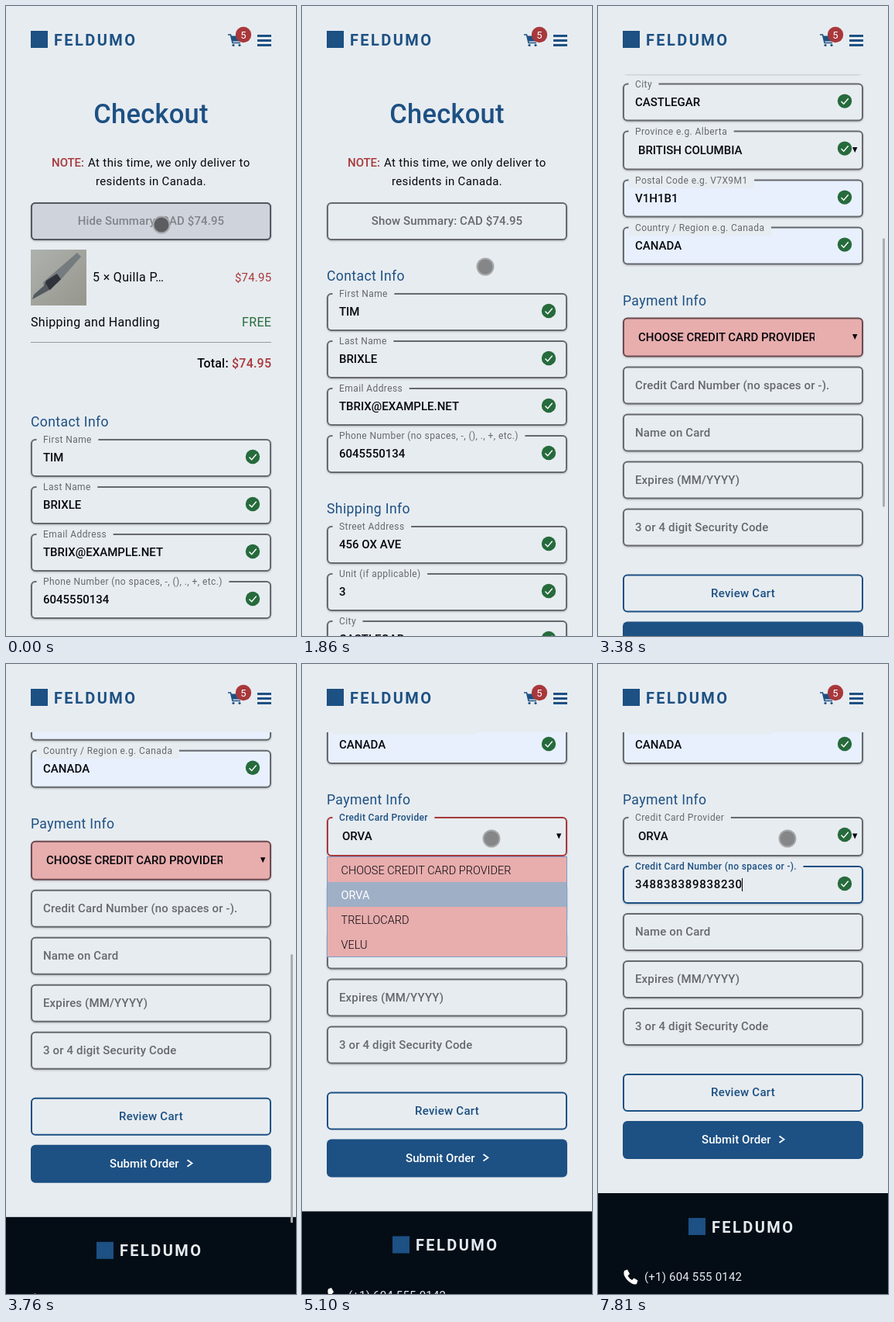
Write an HTML page that moves like this. It is 375 px wide and 812 px high and loops after 8000 ms.

```html
<!DOCTYPE html>
<html lang="en">
<head>
<meta charset="utf-8">
<title>Checkout</title>
<style>
  html, body { margin: 0; width: 100%; height: 100%; overflow: hidden; background: #e7ecf0; }
  svg { display: block; font-family: Roboto, "Open Sans", sans-serif; }
  text { white-space: pre; }
  .raised { filter: drop-shadow(0 1px 1px rgba(0, 0, 0, .22)); }
</style>
</head>
<body>
<svg id="stage" width="375" height="812" viewBox="0 0 375 812"></svg>
<script>
const LOOP = 8000;
const BG = '#e7ecf0', BLUE = '#1d5083', RED = '#a8383b', GRAY = '#66696e', INK = '#05070d';
const GREEN = '#266b3c', PINK = '#e8adad', AUTOFILL = '#e8f0fe', FOOTER = '#040d16';
const BRAND = 'FELDUMO', CARD = 'ORVA', CARD_NUMBER = '348838389838230';
const CHOOSE = 'CHOOSE CREDIT CARD PROVIDER';
const stage = document.getElementById('stage');

function el(tag, attrs, parent = stage) {
  const node = document.createElementNS('http://www.w3.org/2000/svg', tag);
  for (const key in attrs) node.setAttribute(key, attrs[key]);
  return parent.appendChild(node);
}
const group = parent => el('g', {}, parent);
const rect = (parent, x, y, width, height, fill, more) =>
  el('rect', { x, y, width, height, fill, ...more }, parent);
const path = (parent, d, more) => el('path', { d, ...more }, parent);

function text(parent, x, y, str, { size = 15, weight = 500, fill = INK, gap = 0, anchor = 'start' } = {}) {
  const node = el('text', {
    x, y, fill, 'font-size': size, 'font-weight': weight,
    'letter-spacing': gap, 'text-anchor': anchor
  }, parent);
  node.textContent = str;
  return node;
}

const clamp = v => Math.max(0, Math.min(1, v));
const ramp = (t, a, b) => clamp((t - a) / (b - a));
const lerp = (a, b, k) => a + (b - a) * k;
const ease = k => k * k * (3 - 2 * k);
const mix = (a, b, k) => `color-mix(in srgb, ${b} ${k * 100}%, ${a})`;
const show = (node, on) => node.setAttribute('visibility', on ? 'visible' : 'hidden');
const shift = (node, y) => node.setAttribute('transform', `translate(0 ${y})`);

// Linear interpolation through [time, value] points.
function track(points, t) {
  if (t <= points[0][0]) return points[0][1];
  for (let i = 1; i < points.length; i++) {
    const [t0, a] = points[i - 1], [t1, b] = points[i];
    if (t < t1) return lerp(a, b, ramp(t, t0, t1));
  }
  return points[points.length - 1][1];
}

function box(parent, top, height = 49, stroke = GRAY, fill = BG) {
  return rect(parent, 33, top + 1, 309, height - 2, fill,
    { rx: 5, stroke, 'stroke-width': 2, class: 'raised' });
}
function check(parent, top) {
  const g = group(parent);
  el('circle', { cx: 319, cy: top + 23, r: 9.2, fill: GREEN }, g);
  path(g, `M314.5 ${top + 23.5}l3.2 3.2l6-7`, { fill: 'none', stroke: '#fff', 'stroke-width': 1.4 });
  return g;
}
const arrow = (parent, top) => path(parent, `M329 ${top + 21.5}h6.4l-3.2 7z`, { fill: INK });

function floatLabel(parent, top, str, weight = 400, fill = GRAY) {
  const g = group(parent);
  const patch = rect(g, 39.5, top - 7, 10, 18, BG);
  const label = text(g, 48, top + 5, str, { size: 12, weight, fill, gap: weight > 400 ? .33 : .42 });
  patch.setAttribute('width', label.getComputedTextLength() + 17);
  return g;
}
function field(parent, top, label, value, { fill = BG, select = false } = {}) {
  box(parent, top, select ? 51 : 49, GRAY, fill);
  floatLabel(parent, top, label);
  text(parent, select ? 52 : 48, top + (select ? 30 : 29), value);
  check(parent, top);
  if (select) arrow(parent, top);
}
function blank(parent, top, str) {
  box(parent, top);
  text(parent, 48, top + 29, str, { fill: GRAY, gap: .14 });
}
const heading = (parent, y, str) => text(parent, 32, y, str, { size: 17.6, weight: 400, fill: BLUE, gap: .37 });

function brand(parent, x, y, fill) {
  rect(parent, x, y, 22, 22, BLUE);
  text(parent, x + 30, y + 18.5, BRAND, { size: 20, weight: 700, fill, gap: 2.4 });
}

const clip = el('clipPath', { id: 'choice' });
rect(clip, 50, 0, 230, 3000);

// Page content, in document coordinates with the summary closed.
const page = group();
text(page, 187.5, 150.5, 'Checkout', { size: 34.5, fill: BLUE, gap: .25, anchor: 'middle' });
const note = { weight: 400, gap: .36 };
text(page, 59, 207, 'NOTE:', { fill: RED });
text(page, 106, 207, 'At this time, we only deliver to', note);
text(page, 187.5, 231, 'residents in Canada.', { ...note, anchor: 'middle' });

box(page, 253);
const pressed = rect(page, 33, 254, 309, 47, '#cfd3db', { rx: 5, stroke: '#55585f', 'stroke-width': 2 });
const toggle = text(page, 187.5, 282, '', { fill: GRAY, gap: .1, anchor: 'middle' });

const summary = group(page);
const shade = el('linearGradient', { id: 'photo', x1: 0, y1: 0, x2: 1, y2: 1 }, summary);
el('stop', { offset: 0, 'stop-color': '#aeb2ae' }, shade);
el('stop', { offset: 1, 'stop-color': '#96968c' }, shade);
rect(summary, 32, 314, 72, 72, 'url(#photo)');
path(summary, 'M92 318l5 5l-30 34l-17 9l-2-10z', { fill: '#757c7f' });
path(summary, 'M66 345l5 7l-14 14l-8-3l3-9z', { fill: '#30343a' });
path(summary, 'M52 358l4 8l-22 12l2-6z', { fill: '#535a60' });
const plain = { size: 16, weight: 400, gap: .34 };
text(summary, 112, 355, '5 × Quilla P…', plain);
text(summary, 343.3, 355, '$74.95', { weight: 400, fill: RED, gap: .2, anchor: 'end' });
text(summary, 32, 413, 'Shipping and Handling', plain);
text(summary, 343.3, 413, 'FREE', { ...plain, fill: GREEN, anchor: 'end' });
rect(summary, 32, 433, 311, 1, '#979a9e');
const total = text(summary, 343.2, 466, 'Total: ', { size: 16, gap: .2, anchor: 'end' });
const sum = el('tspan', { fill: RED }, total);
sum.textContent = '$74.95';

const form = group(page);
heading(form, 354, 'Contact Info');
field(form, 370, 'First Name', 'TIM');
field(form, 431, 'Last Name', 'BRIXLE');
field(form, 492, 'Email Address', 'TBRIX@EXAMPLE.NET');
field(form, 553, 'Phone Number (no spaces, -, (), ., +, etc.)', '6045550134');
heading(form, 654, 'Shipping Info');
field(form, 670, 'Street Address', '456 OX AVE');
field(form, 731, 'Unit (if applicable)', '3');
field(form, 792, 'City', 'CASTLEGAR');
field(form, 853, 'Province e.g. Alberta', 'BRITISH COLUMBIA', { select: true });
field(form, 916, 'Postal Code e.g. V7X9M1', 'V1H1B1', { fill: AUTOFILL });
field(form, 977, 'Country / Region e.g. Canada', 'CANADA', { fill: AUTOFILL });
heading(form, 1078, 'Payment Info');

const PROVIDER = 1094, NUMBER = 1157;
const providerBox = box(form, PROVIDER, 51);
const providerBlue = floatLabel(form, PROVIDER, 'Credit Card Provider', 500, BLUE);
const providerGray = floatLabel(form, PROVIDER, 'Credit Card Provider');
const choice = text(form, 52, PROVIDER + 30, '');
choice.setAttribute('clip-path', 'url(#choice)');
const providerCheck = check(form, PROVIDER);
arrow(form, PROVIDER);

const lower = group(form);
const numberBox = box(lower, NUMBER);
const numberPatch = rect(lower, 39.5, NUMBER - 7, 0, 18, BG);
const numberLabel = text(lower, 48, 0, 'Credit Card Number (no spaces or -).');
const digits = text(lower, 48, NUMBER + 29, '', { gap: .72 });
const caret = rect(lower, 48, NUMBER + 16, 1, 17, INK);
const numberCheck = check(lower, NUMBER);
blank(lower, 1218, 'Name on Card');
blank(lower, 1279, 'Expires (MM/YYYY)');
blank(lower, 1340, '3 or 4 digit Security Code');
rect(lower, 33, 1426, 309, 47, BG, { rx: 5, stroke: BLUE, 'stroke-width': 2 });
text(lower, 187.5, 1454, 'Review Cart', { fill: BLUE, gap: .25, anchor: 'middle' });
rect(lower, 32, 1486, 311, 49, BLUE, { rx: 6 });
text(lower, 134, 1515, 'Submit Order', { fill: '#fff', gap: .08 });
path(lower, 'M234.5 1505.5l6 4.2l-6 4.2', { fill: 'none', stroke: '#fff', 'stroke-width': 1.8 });
rect(lower, 0, 1579, 375, 400, FOOTER);
brand(lower, 117, 1611, '#e7ecf0');
path(lower, 'M34 1679l4-1.5l3 5.5l-2.5 2.5q2 4 5.500 5.500l2.500-2.500l5 3l-1.500 4.500q-3 1.500-7-1q-7-4-9.500-11q-.5-3 .5-5z',
  { fill: '#fff' });
text(lower, 60, 1692, '(+1) 604 555 0142', { weight: 400, fill: '#e7ecf0', gap: .2 });

const menu = group(form);
rect(menu, 32.5, PROVIDER + 51.5, 310, 129, PINK, { stroke: '#7f9dcb' });
const highlight = rect(menu, 33, 0, 309, 32, '#9fafc6');
const options = [CHOOSE, CARD, 'TRELLOCARD', 'VELU'].map((name, i) =>
  text(menu, 50.5, PROVIDER + 73.5 + 32 * i, name, { size: 14.5, weight: 300 }));

// Fixed header.
rect(stage, 0, 0, 375, 88, BG);
brand(stage, 32, 32, BLUE);
path(stage, 'M287 37h3.500l2.500 10.500h10', { fill: 'none', stroke: BLUE, 'stroke-width': 1.6 });
path(stage, 'M291 38.500h14l-1.800 7h-10.500z', { fill: BLUE });
for (const cx of [294, 302]) el('circle', { cx, cy: 50.5, r: 1.6, fill: BLUE });
el('circle', { cx: 307, cy: 37, r: 10.2, fill: RED });
text(stage, 307, 41.5, '5', { size: 13, weight: 400, fill: '#fff', anchor: 'middle' });
for (const y of [37, 43, 49]) rect(stage, 325, y, 18, 3, BLUE);

const scrollbar = rect(stage, 368, 0, 3, 346, '#a9aeb3', { rx: 1 });
const cursor = el('circle', { r: 10.5, stroke: '#a6a8aa', 'stroke-width': 2 });

const SCROLL = [[1990, 0], [2230, 315], [2290, 315], [2310, 440], [2410, 599], [2520, 656], [2680, 688],
  [3340, 688], [3380, 692], [3500, 742], [3640, 815], [3760, 866], [3880, 888], [4020, 897]];
const CURSOR_X = [[1460, 201], [1860, 237], [2260, 240], [2261, 400], [4250, 400], [4500, 245]];
const CURSOR_Y = [[1460, 282], [1860, 336], [1990, 336], [2230, 21], [2260, -20], [2261, 300], [4250, 300], [4500, 225]];

function draw(t) {
  const scroll = track(SCROLL, t);
  shift(page, -scroll);
  scrollbar.setAttribute('y', 1 + scroll * .431);
  scrollbar.setAttribute('opacity', t < 1990 ? 0
    : t < 3340 ? 1 - ramp(t, 2920, 3150) : 1 - ramp(t, 4250, 4500));

  // Summary toggle.
  const press = t < 850 ? 1 - ramp(t, 50, 110) : 1 - ramp(t, 950, 1130);
  const open = t < 930;
  pressed.setAttribute('opacity', press);
  toggle.setAttribute('opacity', 1 - .25 * press);
  toggle.textContent = (open ? 'Hide' : 'Show') + ' Summary: CAD $74.95';
  show(summary, open);
  shift(form, open ? 188 : 0);

  // Card provider.
  const focus = ramp(t, 4560, 4710);
  const accepted = ramp(t, 6460, 6600);
  const leave = ramp(t, 6940, 7140);
  const chosen = t >= 5100;
  const edge = t < 6460 ? mix('#6b4a50', RED, focus)
    : leave > 0 ? mix(BLUE, GRAY, leave) : mix(RED, BLUE, accepted);
  providerBox.style.stroke = edge;
  providerBox.style.fill = mix(PINK, BG, focus);
  providerBlue.setAttribute('opacity', focus);
  show(providerBlue, t >= 4560 && t < 6940);
  show(providerGray, t >= 6940);
  choice.textContent = chosen ? CARD : CHOOSE;
  show(providerCheck, t >= 6460);
  shift(lower, 23.5 * (ease(focus) - ease(ramp(t, 6460, 6730))));

  show(menu, t >= 4640 && t < 6460);
  const active = chosen ? 1 : 0;
  highlight.setAttribute('y', PROVIDER + 52 + 32 * active);
  options.forEach((o, i) => {
    o.setAttribute('fill', i === active ? '#fff' : INK);
    o.setAttribute('font-weight', i === active ? 400 : 300);
  });

  // Card number.
  const lift = ease(ramp(t, 6940, 7200));
  numberBox.style.stroke = mix(GRAY, BLUE, lift);
  numberLabel.style.fill = mix(GRAY, BLUE, lift);
  numberLabel.setAttribute('font-size', lerp(15, 12, lift));
  numberLabel.setAttribute('letter-spacing', lerp(.14, .33, lift));
  numberLabel.setAttribute('y', NUMBER + lerp(29, 5, lift));
  numberPatch.setAttribute('width', lift > .75 ? numberLabel.getComputedTextLength() + 17 : 0);
  const typed = t < 7630 ? 0 : 4 * (1 + Math.floor((t - 7630) / 60));
  digits.textContent = CARD_NUMBER.slice(0, typed);
  caret.setAttribute('x', typed ? 47.3 + digits.getComputedTextLength() : 48);
  show(caret, (t >= 6940 && t < 7450) || t >= 7630);
  show(numberCheck, typed >= CARD_NUMBER.length);

  cursor.setAttribute('cx', track(CURSOR_X, t));
  cursor.setAttribute('cy', track(CURSOR_Y, t));
  cursor.style.fill = mix('#858688', '#5c5d61', press);
}

function frame() {
  draw(performance.now() % LOOP);
  requestAnimationFrame(frame);
}
frame();
</script>
</body>
</html>
```
